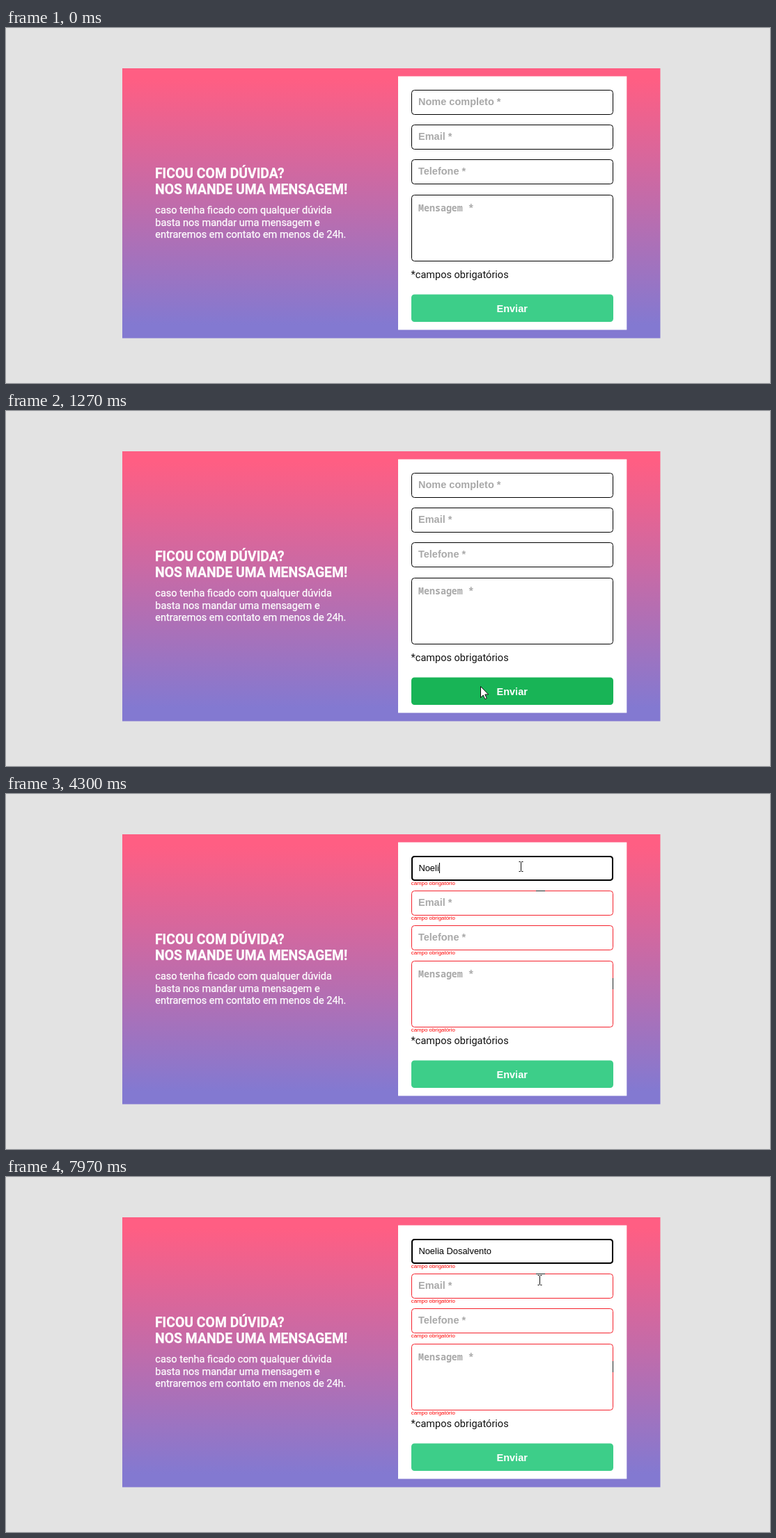
Animation, 1097 px wide and 511 px high, one loop 8000 ms. Source, as an HTML page:

```html
<!DOCTYPE html>
<html lang="pt-BR">
<head>
<meta charset="utf-8">
<title>Formulário de contato</title>
<style>
  html, body { margin: 0; width: 100%; height: 100%; overflow: hidden; background: #e3e3e3; }
  svg { display: block; }
  text { white-space: pre; }
  .title { font: 700 19.36px Roboto, sans-serif; }
  .body { font: 14.52px Roboto, sans-serif; }
  .light { fill: #fff; stroke: #fff; stroke-width: .25; }
  .label { font: 700 14.5px "Liberation Sans", Arial, sans-serif; fill: #a9a9a9; }
  .mono { font: 700 13.3px "Noto Sans Mono", monospace; fill: #a9a9a9; }
  .error { font: 7.9px "Liberation Sans", Arial, sans-serif; fill: #f00; }
  .typed { font: 12.9px "Liberation Sans", Arial, sans-serif; }
  .field { fill: #fff; stroke: #000; }
</style>
</head>
<body>
<svg width="1097" height="511" viewBox="0 0 1097 511">
  <defs>
    <linearGradient id="sky" x1="0" y1="0" x2="0" y2="1">
      <stop offset=".04" stop-color="#ff5e83"/>
      <stop offset=".95" stop-color="#8379d1"/>
    </linearGradient>
  </defs>
  <rect x="167" y="58" width="772.5" height="388.5" fill="url(#sky)"/>
  <g class="light">
    <text class="title" x="214" y="215.7">FICOU COM DÚVIDA?</text>
    <text class="title" x="214" y="238.9">NOS MANDE UMA MENSAGEM!</text>
    <text class="body" x="214.3" y="267.3">caso tenha ficado com qualquer dúvida</text>
    <text class="body" x="214.3" y="284.8">basta nos mandar uma mensagem e</text>
    <text class="body" x="214.3" y="302.3">entraremos em contato em menos de 24h.</text>
  </g>
  <rect x="563" y="69.5" width="328.3" height="365" fill="#fff"/>
  <g id="fields"></g>
  <path id="specks" d="M871.5 265v16M761 139.5h13" stroke="#222"/>
  <text class="body" x="581.6" y="360.2" fill="#111">*campos obrigatórios</text>
  <rect id="button" x="582" y="383.5" width="290" height="39.5" rx="4.5" fill="#3dce89"/>
  <text class="label" x="726.7" y="408.8" text-anchor="middle" style="fill:#fff">Enviar</text>
  <text id="typed" class="typed" x="592.4" y="111"></text>
  <rect id="caret" y="99" width="1" height="15"/>
  <path id="arrow" d="M.5.5V16.6L4.2 13l2.6 5.7 2.5-1.1L6.8 12h4.9z" fill="#fff" stroke="#111"/>
  <path id="beam" d="M-2.5-6.5h2l1 1 1-1h2M-2.5 7.5h2l1-1 1 1h2M.5-5.5v12" fill="none" stroke="#111"/>
</svg>
<script>
const LOOP = 8000, STEP = 1000 / 15;
const ENTER = 130, SUBMIT = 1340, FOCUS = 2630, BLINK = 530;
const LABELS = ['Nome completo *', 'Email *', 'Telefone *', 'Mensagem *'];

// Each word is typed evenly from its first key to its last
const WORDS = [
  { text: 'Noelia ', from: 3430, to: 4500 },
  { text: 'Dosalvento', from: 4960, to: 7160 }
];

// The pointer eases from its last place to `at`, bending towards `via`
const ORIGIN = [949, 250];
const MOVES = [
  { from: 130, to: 860, via: [868, 505], at: [706, 391] },
  { from: 870, to: 1140, at: [681, 396] },
  { from: 1390, to: 1730, at: [943, 377] },
  { from: 1740, to: 2200, at: [763, 131] },
  { from: 2270, to: 2660, at: [739, 104] },
  { from: 7620, to: 7930, via: [875, 168], at: [766, 148] }
];

const $ = id => document.getElementById(id);
const typed = $('typed'), caret = $('caret'), arrow = $('arrow'), beam = $('beam');

function add(tag, attrs, text = '') {
  const el = document.createElementNS('http://www.w3.org/2000/svg', tag);
  for (const key in attrs) el.setAttribute(key, attrs[key]);
  el.textContent = text;
  return $('fields').appendChild(el);
}

function show(el, on) {
  el.style.visibility = on ? 'visible' : 'hidden';
}

const fields = LABELS.map((label, i) => {
  const area = i === 3;
  const y = Math.floor(89.3 + 50.33 * i) + 0.5;
  const height = area ? 95 : 35;
  return {
    y, height,
    box: add('rect', { class: 'field', x: 582.5, y, width: 289, height, rx: 4 }),
    hint: add('text', { class: area ? 'mono' : 'label', x: 592, y: 111 + 50.2 * i + (area ? 2 : 0) }, label),
    error: add('text', { class: 'error', x: 581.7, y: y + height + 6.8 }, 'campo obrigatório')
  };
});
const ring = add('rect',
  { x: 583, y: 90, width: 288, height: 34, rx: 4, fill: 'none', stroke: '#000', 'stroke-width': 2 });

const REST = '#3dce89', HOVER = '#18b456';
const hover = $('button').animate([
  { fill: REST, offset: 0 },
  { fill: REST, offset: 835 / LOOP, easing: 'ease' },
  { fill: HOVER, offset: 1135 / LOOP },
  { fill: HOVER, offset: 1570 / LOOP, easing: 'ease' },
  { fill: REST, offset: 1870 / LOOP },
  { fill: REST, offset: 1 }
], { duration: LOOP, fill: 'both' });
hover.pause();

const easeOut = u => 1 - (1 - u) ** 2;

function pointerAt(t) {
  let p = ORIGIN;
  for (const { from, to, via, at } of MOVES) {
    if (t < from) break;
    const raw = Math.min(1, (t - from) / (to - from));
    const u = via ? raw : easeOut(raw), v = 1 - u;
    p = p.map((a, k) => {
      const mid = via ? via[k] : (a + at[k]) / 2;
      return v * v * a + 2 * u * v * mid + u * u * at[k];
    });
  }
  return p.map(Math.round);
}

function drawPointer(t) {
  const [x, y] = pointerAt(Math.floor(t / STEP) * STEP);
  const overText = x >= 582 && x <= 872 && fields.some(f => y >= f.y && y <= f.y + f.height);
  show(arrow, t >= ENTER && !overText);
  show(beam, t >= ENTER && overText);
  (overText ? beam : arrow).setAttribute('transform', `translate(${x} ${y})`);
}

function typing(t) {
  let text = '', last = FOCUS;
  for (const word of WORDS) {
    if (t < word.from) break;
    const gap = (word.to - word.from) / (word.text.length - 1);
    const count = Math.min(word.text.length, Math.floor((t - word.from) / gap) + 1);
    text += word.text.slice(0, count);
    last = word.from + (count - 1) * gap;
  }
  return { text, last };
}

function drawForm(t) {
  const { text, last } = typing(t);
  const failed = t >= SUBMIT, focused = t >= FOCUS;
  fields.forEach(({ box, hint, error }, i) => {
    box.style.stroke = failed && !(focused && i === 0) ? '#f5222d' : '#000';
    show(hint, i > 0 || !text);
    show(error, failed);
  });
  show(ring, focused);
  typed.textContent = text;
  show(caret, focused && (t - last) % (2 * BLINK) < BLINK);
  caret.setAttribute('x', Math.round(592.6 + (text ? typed.getComputedTextLength() : 0)));
}

const start = performance.now();
function frame() {
  const t = (performance.now() - start) % LOOP;
  hover.currentTime = t;
  drawForm(t);
  show($('specks'), t >= 2200);
  drawPointer(t);
  requestAnimationFrame(frame);
}
frame();
</script>
</body>
</html>
```
